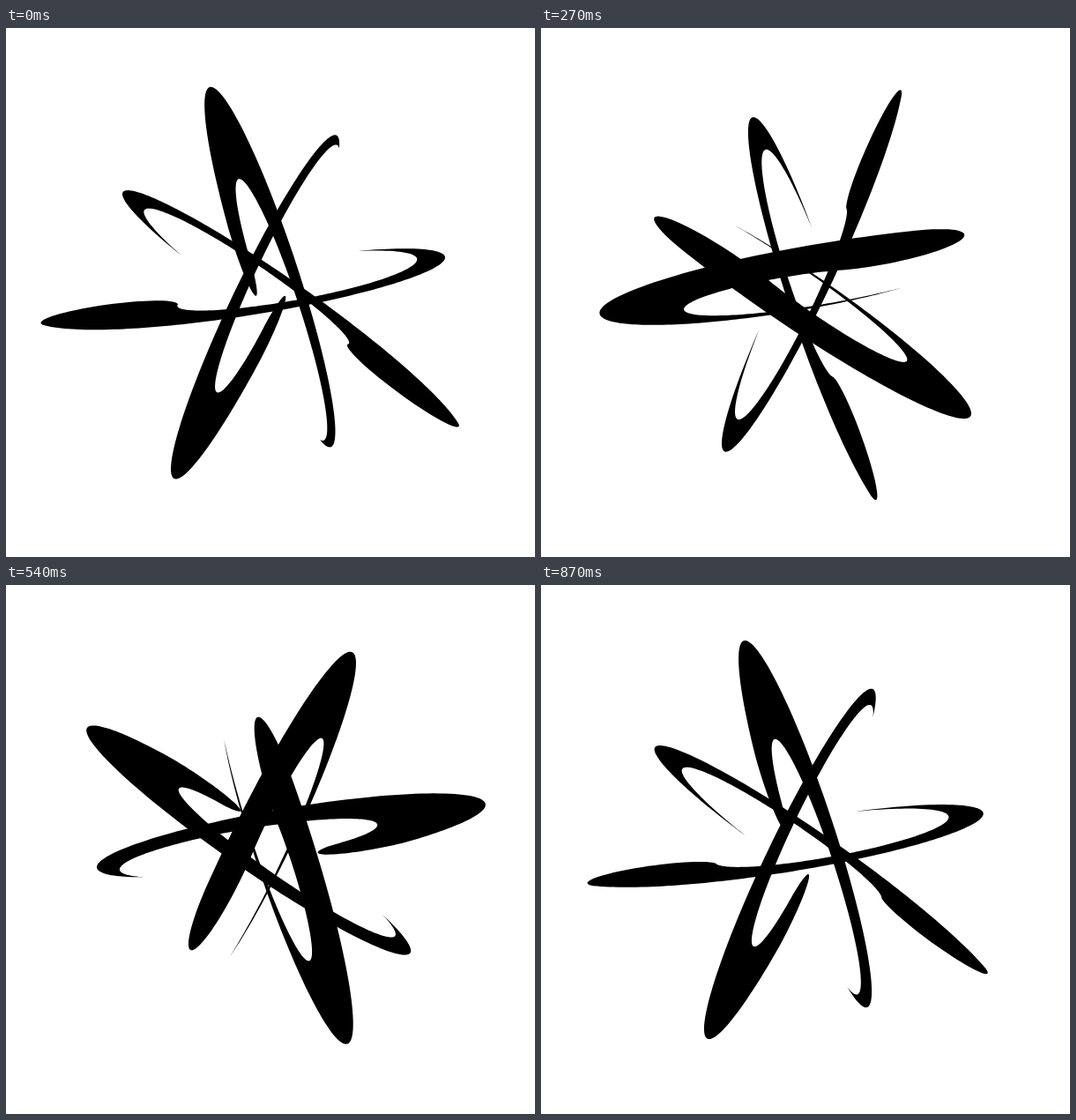
An HTML page that plays this animation: 600x600 px, repeating every 900 ms.

```html
<!DOCTYPE html>
<html lang="en">
<head>
<meta charset="utf-8">
<title>Orbits</title>
<style>
html, body { margin: 0; width: 100%; height: 100%; overflow: hidden; background: #fff; }
svg { display: block; width: 100vw; height: 100vh; }
</style>
</head>
<body>
<svg id="stage" viewBox="0 0 600 600"></svg>
<script>
const LOOP = 900, STEP = 30;
const RAD = Math.PI / 180;
const CX = 300.3, CY = 297.2; // projected centre of all orbits
const EYE = 800;              // viewer distance
const R = 180;                // orbit radius
const SPAN = 248;             // trail length in degrees
const TAPER = 0.3;            // half-width gained per degree from the tail

// axis: screen angle of the long axis; near: side facing the viewer;
// tilt: sine of the inclination; start: tail angle at time zero
const orbits = [
  { axis: 71.6,  near: -1, tilt: 0.131, start: -2 },
  { axis: -64.5, near: -1, tilt: 0.129, start: -2 },
  { axis: 34.7,  near: 1,  tilt: 0.129, start: 118 },
  { axis: 170.5, near: 1,  tilt: 0.138, start: 118 }
];

const stage = document.getElementById('stage');
for (const o of orbits) {
  o.path = document.createElementNS('http://www.w3.org/2000/svg', 'path');
  stage.appendChild(o.path);
}

// Point (u, v) of the orbit plane, seen in perspective
function project(o, u, v) {
  const c = Math.cos(o.axis * RAD), s = Math.sin(o.axis * RAD);
  const depth = v * Math.sqrt(1 - o.tilt * o.tilt);
  const k = EYE / (EYE - depth);
  const x = u * k, y = v * o.tilt * k * o.near;
  return (CX + x * c - y * s).toFixed(2) + ' ' + (CY + x * s + y * c).toFixed(2);
}

function trail(o, tail) {
  const outer = [], inner = [], cap = [];
  for (let d = 0; d <= SPAN; d += 2) {
    const a = (tail + d) * RAD, w = d * TAPER;
    const c = Math.cos(a), s = Math.sin(a);
    outer.push(project(o, (R + w) * c, (R + w) * s));
    inner.unshift(project(o, (R - w) * c, (R - w) * s));
  }
  const head = (tail + SPAN) * RAD, w = SPAN * TAPER;
  for (let d = 5; d < 180; d += 5) {
    const a = head + d * RAD;
    cap.push(project(o, R * Math.cos(head) + w * Math.cos(a),
                        R * Math.sin(head) + w * Math.sin(a)));
  }
  return 'M' + outer.concat(cap, inner).join('L') + 'Z';
}

function draw(ms) {
  const t = Math.floor((ms % LOOP) / STEP) * STEP;
  for (const o of orbits) {
    o.path.setAttribute('d', trail(o, o.start + 360 * t / LOOP));
  }
}

const begin = performance.now();
function tick() {
  draw(performance.now() - begin);
  requestAnimationFrame(tick);
}
tick();
</script>
</body>
</html>
```
